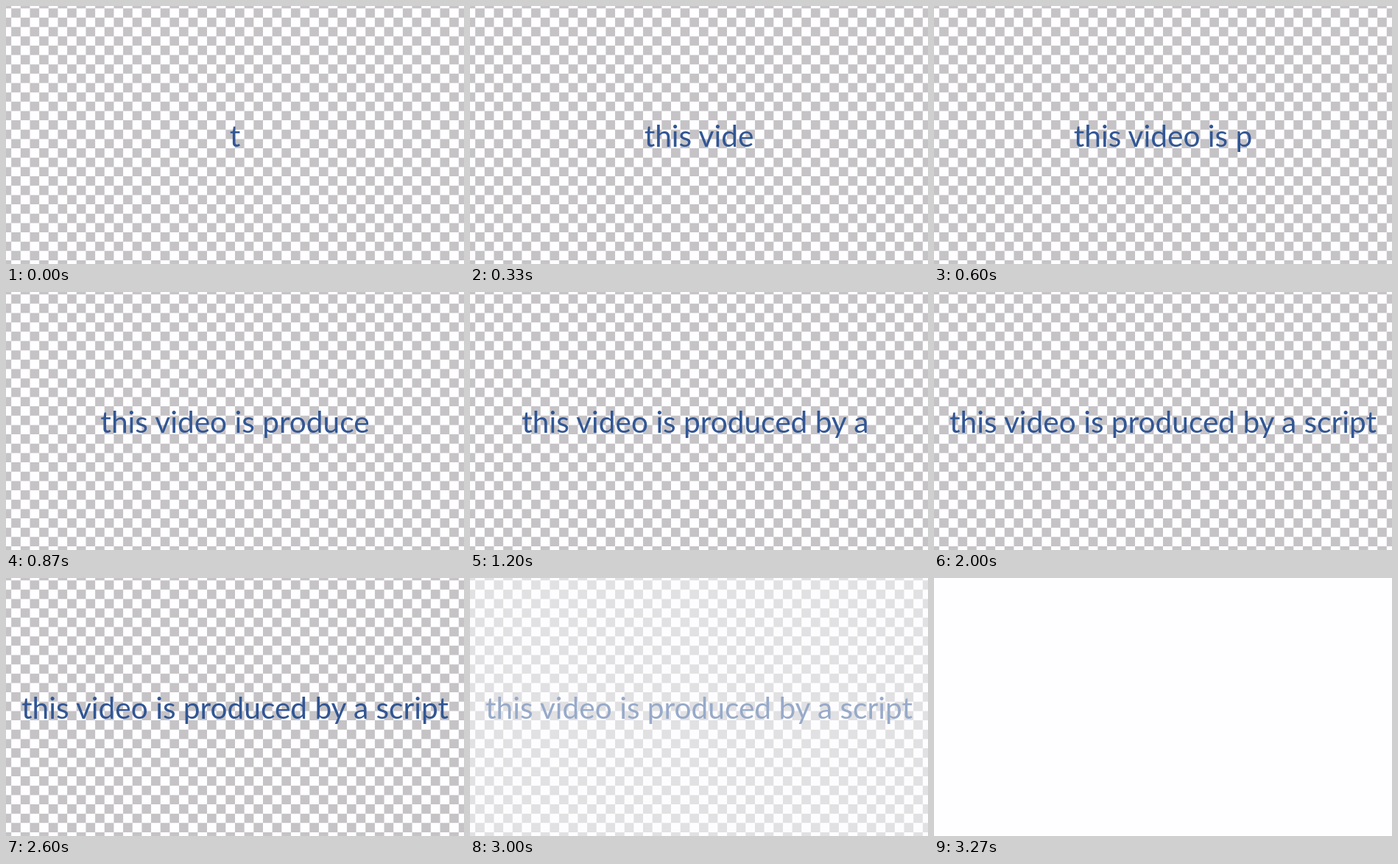
Animation, 622 px wide and 350 px high, one loop 3470 ms. Source, as an HTML page:

```html
<!DOCTYPE html>
<html lang="en">
<head>
<meta charset="utf-8">
<title>Typed line on a checkerboard</title>
<style>
  html, body { margin: 0; width: 100%; height: 100%; overflow: hidden; background: #fefdff; }
  svg { display: block; width: 622px; height: 350px; }
  text { font-family: Lato, Carlito, sans-serif; fill: #315694; text-anchor: middle; white-space: pre; }
</style>
</head>
<body>
<svg viewBox="0 0 622 350">
  <rect width="622" height="350" fill="#fefdff"/>
  <path id="checks" fill="#c5c3c6"/>
  <text id="line" x="311" y="191"></text>
  <rect id="veil" width="622" height="350" fill="#fefdff" opacity="0"/>
</svg>
<script>
const LOOP = 3470, STEP = 200 / 3;
const TEXT = 'this video is produced by a script';
const LINE_WIDTH = 581;
const $ = id => document.getElementById(id);
const line = $('line'), veil = $('veil');

function drawChecks() {
  const size = 12.66, left = 7.16 - size, top = 3.2;
  let d = '';
  for (let row = -1; row < 28; row++) {
    for (let col = 0; col < 50; col++) {
      if ((row + col) % 2 === 0) continue;
      d += `M${(left + col * size).toFixed(2)} ${(top + row * size).toFixed(2)}h${size}v${size}h${-size}z`;
    }
  }
  $('checks').setAttribute('d', d);
}

// One uniform font size at which the complete line spans LINE_WIDTH.
function fontSize() {
  const pen = document.createElement('canvas').getContext('2d');
  pen.font = '100px Lato, Carlito, sans-serif';
  const m = pen.measureText(TEXT);
  return 100 * LINE_WIDTH / (m.actualBoundingBoxLeft + m.actualBoundingBoxRight);
}

const typed = step => step < 1 ? 1 : Math.min(TEXT.length, Math.floor(2.45 + 1.46 * step));
const fade = step => Math.min(1, Math.max(0, (step - 41) / 8));

function render(ms) {
  const step = Math.min(49, Math.floor((ms % LOOP + 4) / STEP));
  // A trailing space still counts when the line is centred.
  const shown = TEXT.slice(0, typed(step)).replace(/ $/, '\u00a0');
  if (line.textContent !== shown) line.textContent = shown;
  veil.setAttribute('opacity', fade(step));
}

drawChecks();
line.style.fontSize = fontSize() + 'px';
const start = performance.now();
function tick() {
  render(performance.now() - start);
  requestAnimationFrame(tick);
}
render(0);
requestAnimationFrame(tick);
</script>
</body>
</html>
```
